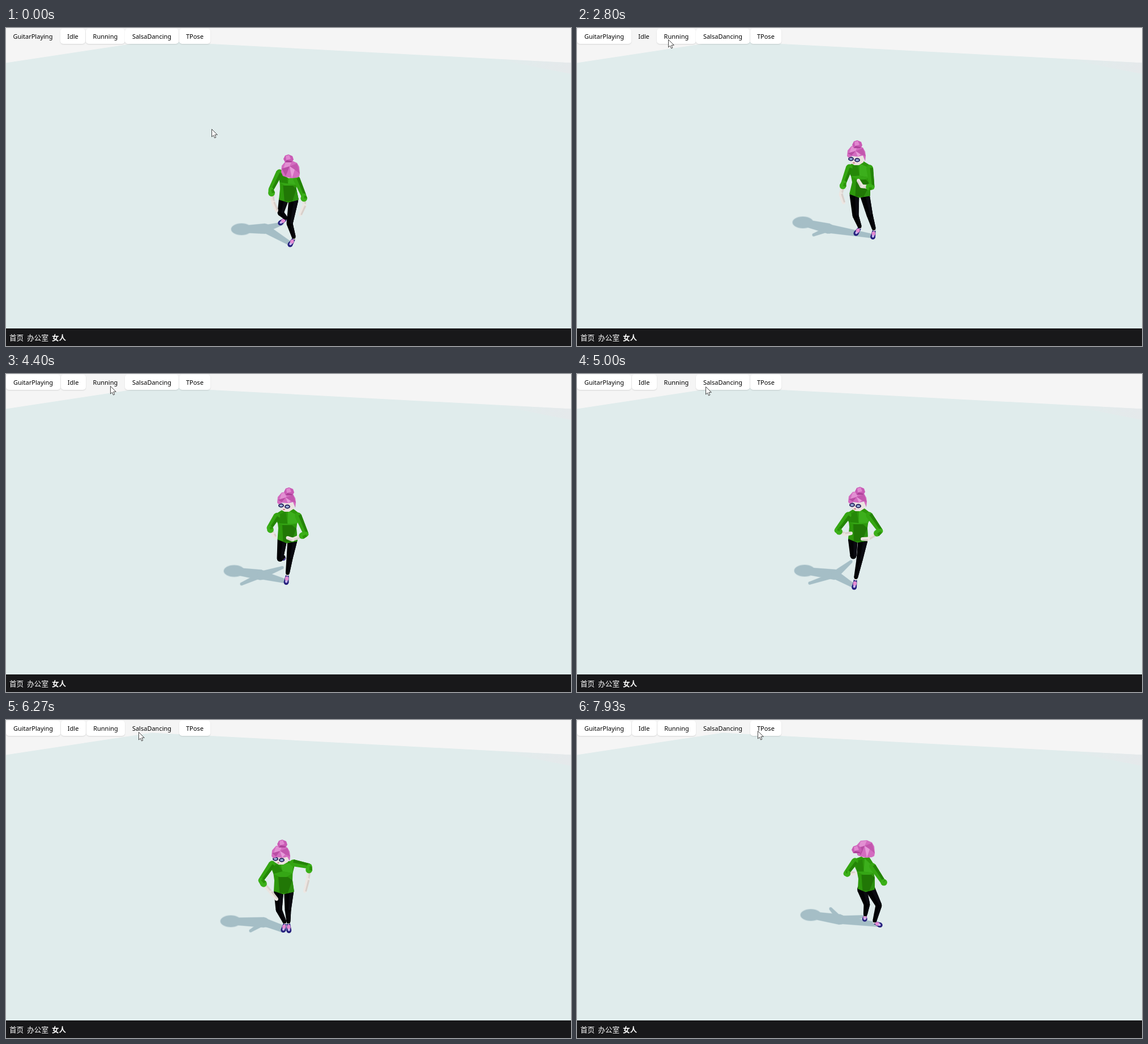
Recreate the animation shown at these times as an HTML page with a canvas. Size 998x561 px, loop 8 s.

```html
<!DOCTYPE html>
<html lang="zh">
<head>
<meta charset="utf-8">
<title>Character viewer</title>
<style>
  html, body { margin: 0; width: 100%; height: 100%; overflow: hidden; background: #f5f5f5; }
  canvas, svg, button, footer { position: absolute; left: 0; top: 0; }
  #figure { left: 370px; top: 185px; }
  button {
    top: .5px; height: 27px; padding: 0; border: 0; border-radius: 5px;
    background: #fff; box-shadow: 0 1px 2px #0002; color: #000;
    font: 11px/27px "Noto Sans", sans-serif; text-align: center; white-space: nowrap;
  }
  button.active { background: none; box-shadow: none; }
  footer {
    top: 530px; width: 998px; height: 31px; box-sizing: border-box; padding-left: 6px;
    display: flex; gap: 6px; background: #18181a; color: #fff;
    font: 12.6px/32px "Noto Sans CJK SC", "Noto Sans CJK", sans-serif;
  }
  #cursor { overflow: visible; }
</style>
</head>
<body>
<svg width="998" height="530">
  <linearGradient id="haze">
    <stop offset="0" stop-color="#e5e9eb" stop-opacity="0"/>
    <stop offset="1" stop-color="#e5e9eb"/>
  </linearGradient>
  <path d="M0 61.5L257 22.5L998 61.5V530H0Z" fill="#e0ecec"/>
  <path d="M860 54L998 61.5V81Z" fill="url(#haze)"/>
</svg>
<canvas id="figure" width="210" height="220"></canvas>
<nav></nav>
<footer><span>首页</span><span>办公室</span><b>女人</b></footer>
<svg id="cursor" width="12" height="18">
  <path d="M.5 .5V14L3.6 11.2L5.6 16L7.8 15L5.9 10.3H10.3Z" fill="#fff" stroke="#333" stroke-width=".9"/>
</svg>
<script>
const LOOP = 8000, STEP = LOOP / 120;
const ctx = document.getElementById('figure').getContext('2d');
const cursor = document.getElementById('cursor');
ctx.translate(-370, -185);

// Buttons: label, left edge, width
const buttons = [
  ['GuitarPlaying', .4, 95.2], ['Idle', 96.6, 44], ['Running', 141.6, 68.8],
  ['SalsaDancing', 211, 94.2], ['TPose', 306.2, 55.6]
].map(([label, left, width]) => {
  const el = document.createElement('button');
  el.textContent = label;
  el.style.width = width + 'px';
  document.querySelector('nav').append(el);
  return { el, left };
});

// A pose is [face visibility, x, y, x, y, ...] in the order of JOINTS.
const JOINTS = ('bun head neck shL elL wrL haL shR elR wrR haR waL waR hemL hemR ' +
  'knL anL toL knR anR toR sHead sMid sArm sFoot').split(' ');

const guitar = [0, 499,230, 502,248, 500,262, 483,255, 468,285, 472,308, 478,322,
  513,266, 526,296, 527,313, 520,329, 484,284, 513,284, 482,303, 517,303,
  485,326, 495,336, 482,346, 501,345, 509,371, 500,385, 416,355, 458,354, 450,360, 488,345];
const idle = [1, 495,205, 493,221, 499,241, 481,246, 471,273, 466,293, 471,308,
  517,247, 521,281, 503,279, 497,269, 486,272, 518,275, 481,293, 518,296,
  492,331, 500,352, 491,365, 517,330, 525,356, 522,372, 399,343, 445,354, 418,365, 493,362];
const runPass = [1, 500,208, 495,223, 498,243, 478,252, 471,267, 471,283, 467,294,
  516,251, 524,288, 498,293, 491,287, 481,274, 513,274, 480,293, 516,296,
  480,330, 494,331, 492,345, 503,322, 502,346, 500,362, 404,348, 446,355, 421,372, 492,352];
const runReach = [1, 500,206, 495,221, 498,241, 479,249, 459,276, 474,283, 484,281,
  516,249, 536,277, 514,291, 504,291, 481,270, 513,272, 479,291, 514,294,
  488,321, 487,314, 487,306, 499,328, 492,362, 489,380, 402,347, 456,354, 411,369, 484,331];
const salsaFront = [.8, 488,218, 485,235, 485,256, 470,254, 450,283, 468,304, 478,316,
  507,252, 536,258, 533,282, 528,302, 474,283, 506,283, 473,302, 509,303,
  482,335, 493,358, 489,374, 498,335, 499,358, 500,375, 397,355, 456,357, 432,372, 488,372];
const salsaBack = [0, 494,228, 509,226, 508,246, 491,249, 475,271, 484,271, 491,270,
  522,258, 541,286, 545,288, 541,284, 497,280, 526,278, 496,298, 526,299,
  512,325, 509,345, 508,353, 533,327, 525,357, 538,363, 413,344, 465,352, 448,333, 504,347];

const clamp = u => Math.max(0, Math.min(1, u));
const ease = u => (u = clamp(u), u * u * (3 - 2 * u));
const between = (t, from, to) => ease((t - from) / (to - from));
const mix = (a, b, u) => a.map((v, i) => v + (b[i] - v) * u);

function moved(pose, offsets) {
  const out = pose.slice();
  for (const [name, [dx, dy]] of Object.entries(offsets)) {
    const i = 1 + 2 * JOINTS.indexOf(name);
    out[i] += dx;
    out[i + 1] += dy;
  }
  return out;
}

const guitarLean = moved(guitar, {
  bun: [-3, -3], head: [-4, -4], neck: [-2, -2], shL: [-2, -2], elL: [-1, 1], wrL: [-5, -2],
  haL: [-7, 1], haR: [1, 2], toL: [-1, 2], anR: [3, -1], toR: [3, 0], sHead: [-4, -1], sMid: [2, -2]
});

// Swap left and right limbs about the body axis.
function mirror(pose) {
  const out = pose.slice();
  JOINTS.forEach((name, i) => {
    if (!/[LR]$/.test(name)) return;
    const other = JOINTS.indexOf(name.slice(0, -1) + (name.endsWith('L') ? 'R' : 'L'));
    out[1 + 2 * i] = 996 - pose[1 + 2 * other];
    out[2 + 2 * i] = pose[2 + 2 * other];
  });
  return out;
}

const stride = [runReach, runPass, mirror(runReach), mirror(runPass)];
function running(t) {
  const phase = (t - 3800) / 171.43 + 29;
  const i = Math.floor(phase);
  return mix(stride[i % 4], stride[(i + 1) % 4], ease(phase - i));
}

function salsa(t) {
  const u = clamp((t - 6270) / 1660);
  const sway = 9 * Math.sin(Math.PI * 3 * u);
  return mix(salsaFront, salsaBack, ease(u)).map((v, i) => i % 2 && i < 31 ? v + sway : v);
}

function poseAt(t) {
  let pose = mix(guitar, guitarLean, between(t, 0, 1200));
  pose = mix(pose, idle, between(t, 1200, 1700));
  if (t > 3200) pose = mix(pose, running(t), between(t, 3200, 3600));
  if (t > 5400) pose = mix(pose, salsa(t), between(t, 5400, 5900));
  const joints = { face: pose[0] };
  JOINTS.forEach((name, i) => joints[name] = [pose[1 + 2 * i], pose[2 + 2 * i]]);
  return joints;
}

function poly(color, ...points) {
  ctx.fillStyle = color;
  ctx.beginPath();
  points.forEach(([x, y]) => ctx.lineTo(x, y));
  ctx.fill();
}

function oval(color, [x, y], rx, ry) {
  ctx.fillStyle = color;
  ctx.beginPath();
  ctx.ellipse(x, y, rx, ry, 0, 0, 2 * Math.PI);
  ctx.fill();
}

// Tapered limb; the optional second color shades one side.
function limb(a, b, wa, wb, color, side) {
  const d = Math.hypot(b[0] - a[0], b[1] - a[1]) || 1;
  const nx = (a[1] - b[1]) / d / 2, ny = (b[0] - a[0]) / d / 2;
  const off = (p, w) => [p[0] + nx * w, p[1] + ny * w];
  oval(color, a, wa * .48, wa * .48);
  oval(color, b, wb * .48, wb * .48);
  poly(color, off(a, wa), off(b, wb), off(b, -wb), off(a, -wa));
  if (side) poly(side, off(a, -wa * .1), off(b, -wb * .1), off(b, -wb), off(a, -wa));
}

function drawShadow(j) {
  // A paler, wider pass softens the edge.
  for (const [color, grow] of [['#c6d8dc', 1], ['#a5bec6', 0]]) {
    const part = (a, b, wa, wb) => limb(a, b, wa + grow, wb + grow, color);
    oval(color, j.sHead, 18 + grow, 10 + grow);
    part(j.sHead, j.sMid, 12, 18);
    part(j.sMid, j.sArm, 10, 5);
    part(j.sMid, j.sFoot, 13, 5);
    part(j.sMid, mix(j.toR, j.anR, .3), 15, 7);
  }
}

function drawLeg(hip, knee, ankle, toe) {
  limb(mix(ankle, toe, .15), mix(ankle, toe, .8), 6, 9, '#25207d');
  limb(mix(ankle, toe, .35), mix(ankle, toe, .5), 6, 6, '#e48bd3');
  limb(mix(ankle, toe, .68), mix(ankle, toe, .74), 4, 4, '#c8b7ed');
  limb(mix(ankle, knee, .1), ankle, 5, 5, '#ece6e4');
  limb(knee, mix(ankle, knee, .1), 11, 7, '#020204', '#09090e');
  limb(hip, knee, 17, 11, '#020204', '#0a0a10');
}

function drawArm(shoulder, elbow, wrist, hand) {
  limb(elbow, wrist, 8, 6, '#e9e4e0', '#d9d2ce');
  limb(wrist, hand, 7, 6, '#ece6e2', '#d8cfca');
  limb(shoulder, elbow, 12, 9, '#34a512', '#248407');
  limb(elbow, mix(elbow, wrist, .28), 9, 12, '#3bb019', '#2b9309');
}

function drawTorso(j) {
  const at = (p, x, y) => [p[0] + x, p[1] + y];
  const mid = mix(j.waL, j.waR, .5), hem = at(mix(j.hemL, j.hemR, .5), -1, 5);
  const bustL = mix(j.shL, j.waL, .6), bustR = mix(j.shR, j.waR, .6);
  const chest = at(mix(j.shL, j.shR, .5), 0, 14);
  poly('#2d980c', at(j.neck, -6, -5), at(j.shL, -3, -3), at(j.shL, -2, 6), bustL, j.waL, j.hemL,
    hem, j.hemR, j.waR, bustR, at(j.shR, 3, 4), at(j.shR, 2, -4), at(j.neck, 7, -6));
  poly('#3caf1c', at(j.neck, 0, -2), j.shR, bustR, chest);
  poly('#258808', j.shL, at(j.neck, -4, 0), chest, bustL);
  poly('#35a615', bustL, chest, bustR, at(mid, 5, -6), at(mid, -6, -6));
  poly('#217706', at(mid, -9, -6), at(mid, 8, -6), j.waR, mix(hem, j.hemR, .4), mix(j.hemL, hem, .6));
  poly('#2c9010', j.waR, j.hemR, mix(hem, j.hemR, .4));
}

function drawHead({ head, bun, face }) {
  const at = (x, y) => [head[0] + x, head[1] + y];
  const low = (back, front) => back + (front - back) * face;
  poly('#ece2e0', at(-11, 7), at(14, 5), at(13, low(13, 16)), at(5, low(16, 21)),
    at(-3, low(17, 21)), at(-10, low(13, 17)));
  for (const [x, y] of [[-9, 10], [2, 12]]) {
    oval('#29245f', at(x, y), 5, 3.7);
    oval('#9eb6dc', at(x, y), 3, 1.8);
  }
  oval('#b84350', at(-4, 17), 2 * face, .8);
  const temple = at(17, low(9, 5)), crown = at(-1, -4), fringe = at(3, low(17, 6));
  poly('#d36cc0', at(-16, low(6, 5)), at(-15, -5), at(-8, -13), at(3, -14), at(12, -10), at(16, -3),
    temple, at(16, 14), at(12, low(16, 4)), fringe, at(-7, low(15, 5)), at(-13, low(13, 8)));
  poly('#e28fd2', at(-8, -12), at(3, -13), crown, at(-12, 0));
  poly('#c357ae', crown, at(12, -9), temple, at(8, 2));
  poly('#e69bd9', crown, at(8, 2), fringe);
  poly('#b94da4', at(-15, 0), crown, at(-8, low(13, 4)));
  const b = (x, y) => [bun[0] + x, bun[1] + y];
  poly('#c95bb5', b(-9, 1), b(-6, -5), b(0, -7), b(7, -4), b(9, 2), b(6, 7), b(-6, 7));
  poly('#e187d0', b(-5, -4), b(1, -6), b(4, 1), b(-4, 3));
  poly('#ad4299', b(-6, 7), b(-3, 3), b(6, 5), b(5, 7));
}

function drawFigure(j) {
  ctx.clearRect(370, 185, 210, 220);
  drawShadow(j);
  drawLeg(mix(j.hemL, j.hemR, .24), j.knL, j.anL, j.toL);
  drawLeg(mix(j.hemL, j.hemR, .74), j.knR, j.anR, j.toR);
  drawTorso(j);
  drawArm(j.shL, j.elL, j.wrL, j.haL);
  drawArm(j.shR, j.elR, j.wrR, j.haR);
  drawHead(j);
}

// Cursor stops: time, x, y
const path = [[70, 363, 178], [800, 107, 14], [2000, 107, 14], [2580, 161, 20], [4200, 161, 20],
  [4700, 227, 22], [5300, 227, 22], [5550, 234, 21], [6600, 234, 21], [7750, 319, 19]];
function cursorAt(t) {
  const next = path.findIndex(stop => stop[0] > t);
  if (next === 0) return path[0];
  if (next < 0) return path[path.length - 1];
  const a = path[next - 1], b = path[next];
  return mix(a, b, between(t, a[0], b[0]));
}

let shownActive = -1;
function showActive(active) {
  if (active === shownActive) return;
  shownActive = active;
  buttons.forEach(({ el, left }, i) => {
    el.classList.toggle('active', i === active);
    el.style.left = left - (i >= active ? .6 : 0) + 'px';
  });
}

function render(t) {
  drawFigure(poseAt(t));
  showActive([1000, 3200, 5400].filter(click => t >= click).length);
  const [, x, y] = cursorAt(t);
  cursor.style.left = x + 'px';
  cursor.style.top = y + 'px';
}

const start = performance.now();
let shownStep = -1;
function tick() {
  const step = Math.floor(((performance.now() - start) % LOOP) / STEP + .1);
  if (step !== shownStep) render((shownStep = step) * STEP);
  requestAnimationFrame(tick);
}
tick();
</script>
</body>
</html>
```
